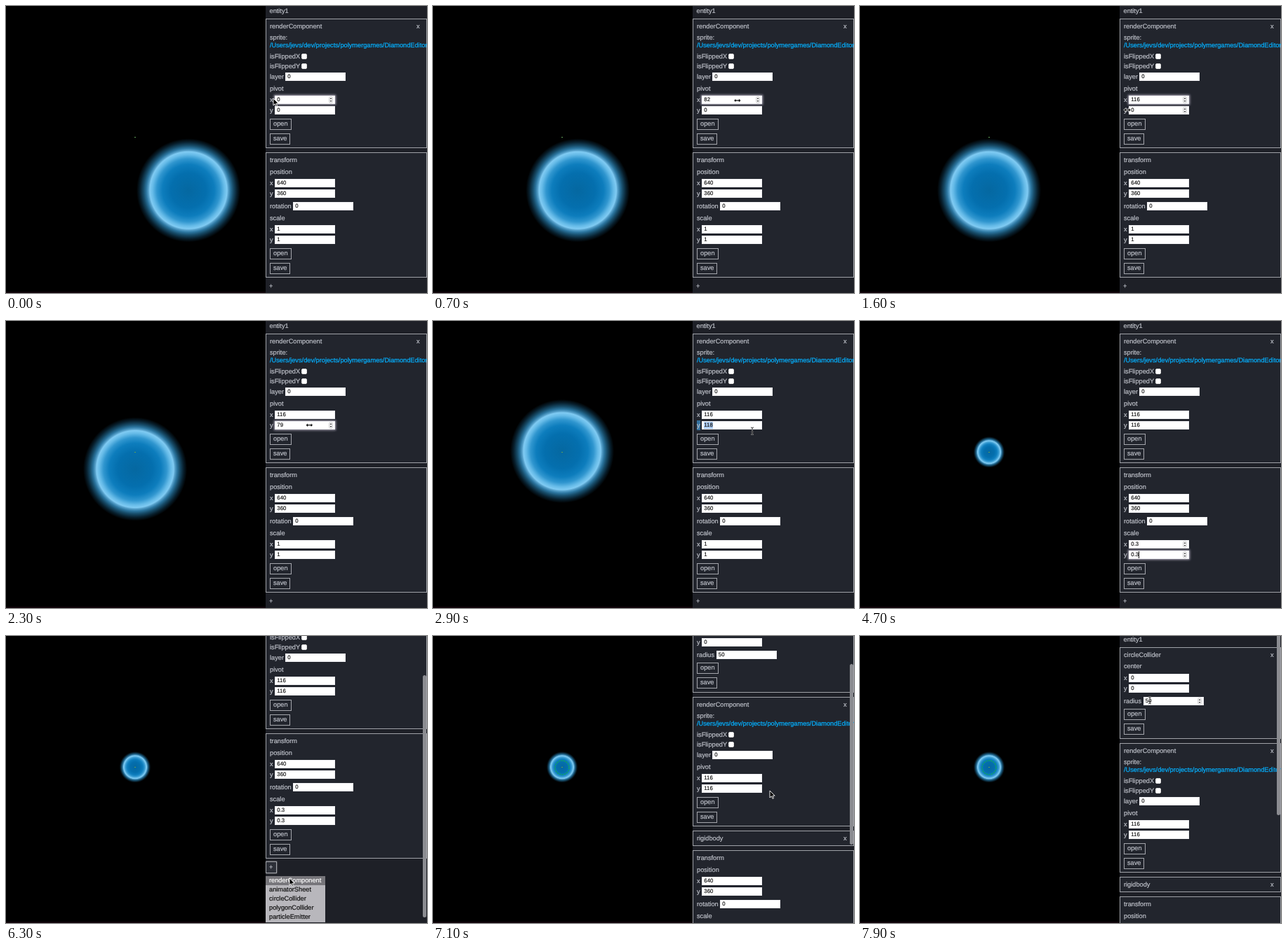
Write an HTML page that moves like this. It is 600 px wide and 410 px high and loops after 8 s.

```html
<!DOCTYPE html>
<html lang="en">
<head>
<meta charset="utf-8">
<title>Component editor</title>
<style>
html, body { margin: 0; width: 100%; height: 100%; overflow: hidden; background: #000; }
#stage { position: relative; width: 600px; height: 410px; overflow: hidden; background: #000;
  font: 9.22px/14px "Liberation Sans", Arial, sans-serif; color: #bfc2ca; text-rendering: geometricPrecision; }
#stage * { position: absolute; box-sizing: border-box; white-space: pre; }
#sprite { width: 152px; height: 152px; left: -76px; top: -76px;
  background: radial-gradient(circle 76px, #0568a1 0, #046fae 25px, #0d7dbd 37px, #3096cf 45px,
    #66bbe8 51px, #80cbf3 55px, #559fc9 57px, #2c76a0 60px, #174c69 64px, #08202e 69px, #000 74px); }
#pin { left: 183px; top: 187px; width: 2px; height: 1px; background: #5f9f58; }
#strip { left: 0; top: 408px; width: 600px; height: 2px; background: #10050a; }
#panel { left: 370px; top: 0; width: 230px; height: 410px; overflow: hidden; background: #1e2027; }
#list { left: 0; top: 0; width: 230px; }
.box { left: 0; width: 230px; border: 1px solid #a0a2a8; background: #22252d; }
.box > * { margin: -1px 0 0 -1px; }
.label, .button { -webkit-text-stroke: .2px currentColor; }
.link { color: #06a9f4; -webkit-text-stroke-width: .3px; }
.marked { background: #34719f; }
.field { width: 86px; height: 12px; background: #fff; border: 1px solid #f0f0f3; color: #111;
  font-size: 7.8px; line-height: 10px; }
.field.focus { box-shadow: 0 0 3px 1px #aaa6b6; }
.value { height: 10px; -webkit-text-stroke: .15px currentColor; }
.value.marked { background: #aecdf3; }
.value.caret { border-right: 1px solid #111; }
.spin { width: 6px; height: 10px; }
.check { width: 8px; height: 8px; border-radius: 2px; background: #fff; border: 1px solid #ddd; }
.button { height: 16px; border: 1px solid #a4a6ac; line-height: 13px; padding: 0 4px; }
#plus { left: 0; width: 16px; height: 17px; border: 1px solid transparent; line-height: 15px; padding-left: 4px; }
#plus.focus { border-color: #a4a6ac; background: #2d3038; box-shadow: 0 0 2px #888; }
#menu { left: 0; width: 85px; height: 66px; background: #b8b7bc; color: #111; }
.item { left: 0; width: 85px; height: 13px; line-height: 13px; padding-left: 5px; }
.item.hover { background: #77767b; color: #fff; }
#thumb { right: 1px; width: 5px; border-radius: 3px; background: #8b8c91; }
svg { overflow: visible; }
</style>
</head>
<body>
<div id="stage">
  <div id="holder" style="left:0;top:0"><div id="sprite"></div></div>
  <svg id="ring" width="1" height="1" style="left:184px;top:187.5px">
    <circle r="10" fill="none" stroke="#0fa85c" stroke-width="1.4" stroke-dasharray="2.2 1.3"/>
  </svg>
  <div id="pin"></div>
  <div id="strip"></div>
  <div id="panel"><div id="list"></div><div id="thumb"></div></div>
  <svg id="cursor" width="1" height="1" style="left:0;top:0">
    <path id="arrow" d="M0 0V10L2.4 7.8L4 11.4L5.6 10.7L4 7.2H7.2Z" fill="#000" stroke="#fff" stroke-width=".9"/>
    <path id="resize" d="M-5 0L-2 -3V-1H2V-3L5 0L2 3V1H-2V3Z" fill="#000" stroke="#fff" stroke-width=".8"/>
    <g id="beam" fill="none">
      <path d="M-2 -5Q0 -5 0 -3.5Q0 -5 2 -5M0 -3.5V3.5M-2 5Q0 5 0 3.5Q0 5 2 5M-1.3 1.5H1.3" stroke="#fff" stroke-opacity=".55" stroke-width="1.8"/>
      <path d="M-2 -5Q0 -5 0 -3.5Q0 -5 2 -5M0 -3.5V3.5M-2 5Q0 5 0 3.5Q0 5 2 5M-1.3 1.5H1.3" stroke="#222" stroke-width=".9"/>
    </g>
  </svg>
</div>
<script>
const LOOP = 8000, STEP = 100, VIEW = 410, ZOOM = 0.655, GAP = 6;
const $ = id => document.getElementById(id);
const list = $('list');
const fields = {};

function add(parent, cls, x, y, text = '') {
  const el = document.createElement('div');
  el.className = cls;
  el.style.left = x + 'px';
  el.style.top = y + 'px';
  el.textContent = text;
  parent.append(el);
  return el;
}

// Vertical positions are row centres, measured from the top of the box.
const label = (box, text, y, x = 6) => add(box, 'label', x, y - 7, text);

function field(box, name, text, y, x, value) {
  const tag = label(box, text, y);
  const el = add(box, 'field', x, y - 6);
  const val = add(el, 'value', 2.3, 0, value);
  const spin = add(el, 'spin', 76, 0);
  spin.innerHTML = '<svg width="6" height="10"><rect x=".5" y=".5" width="5" height="9" rx="2" fill="#f4f4f4" stroke="#c4c4c8" stroke-width=".7"/>' +
    '<path d="M1.5 4L3 2L4.5 4ZM1.5 6L3 8L4.5 6Z" fill="#444"/></svg>';
  fields[name] = { tag, el, val, spin };
}

function check(box, text, y) {
  label(box, text, y);
  add(box, 'check', 51, y - 4);
}

function makeBox(title, height, closable = true) {
  const el = add(list, 'box', 0, 0);
  el.style.height = height + 'px';
  label(el, title, 11);
  if (closable) label(el, 'x', 11, 215);
  return { el, height };
}

function buttons(box, y) {
  add(box, 'button', 6, y - 8, 'open');
  add(box, 'button', 6, y + 13, 'save');
}

label(list, 'entity1', 7, 5.5);

const collider = makeBox('circleCollider', 131);
label(collider.el, 'center', 27);
field(collider.el, 'cx', 'x', 44, 13, '0');
field(collider.el, 'cy', 'y', 59, 13, '0');
field(collider.el, 'radius', 'radius', 77, 33.5, '50');
buttons(collider.el, 96);

const render = makeBox('renderComponent', 185);
label(render.el, 'sprite:', 26.5);
label(render.el, '/Users/jevs/dev/projects/polymergames/DiamondEditor', 37.5).classList.add('link');
check(render.el, 'isFlippedX', 53.5);
check(render.el, 'isFlippedY', 68);
field(render.el, 'layer', 'layer', 83, 28, '0');
label(render.el, 'pivot', 100);
field(render.el, 'px', 'x', 116, 13, '0');
field(render.el, 'py', 'y', 131, 13, '0');
buttons(render.el, 151);

const rigid = makeBox('rigidbody', 22);

const transform = makeBox('transform', 179, false);
label(transform.el, 'position', 27.5);
field(transform.el, 'x', 'x', 44, 13, '640');
field(transform.el, 'y', 'y', 59, 13, '360');
field(transform.el, 'rotation', 'rotation', 76.5, 39, '0');
label(transform.el, 'scale', 93.5);
field(transform.el, 'sx', 'x', 110, 13, '1');
field(transform.el, 'sy', 'y', 125, 13, '1');
buttons(transform.el, 144.5);

const plus = add(list, 'label', 0, 0, '+');
plus.id = 'plus';
const menu = add(list, '', 0, 0);
menu.id = 'menu';
const items = ['renderComponent', 'animatorSheet', 'circleCollider', 'polygonCollider', 'particleEmitter']
  .map((name, i) => add(menu, 'item label', 0, i * 13, name));

// Linear value through [time, value] points.
function ramp(t, points) {
  let [t0, v0] = points[0];
  for (const [t1, v1] of points) {
    if (t < t1) return t1 === t0 ? v1 : v0 + (v1 - v0) * Math.max(0, t - t0) / (t1 - t0);
    t0 = t1; v0 = v1;
  }
  return v0;
}

// Latest value in a list of [time, value] steps.
const hold = (t, steps) => steps.reduce((v, s) => t >= s[0] ? s[1] : v, steps[0][1]);

const PIVOT_X = [[0, 0], [900, 106], [1100, 116]];
const PIVOT_Y = [[1700, 0], [2600, 118], [3100, 118], [3300, 116]];
const SCALE_X = [[0, '1'], [4200, '0'], [4300, '0.'], [4400, '0.3']];
const SCALE_Y = [[0, '1'], [4600, '0'], [4700, '0.3']];
const SCROLL = [[5600, 0], [5900, 70], [6600, 70], [6800, 206], [6900, 206], [7100, 68], [7200, 68], [7700, 2]];
const CURSOR_X = [[0, 381], [100, 382], [900, 451], [1100, 458], [1300, 458], [1600, 381], [1700, 381],
  [2600, 458], [2900, 455], [3100, 463], [3400, 463], [3800, 455], [5100, 455], [5500, 376],
  [5800, 376], [6100, 404], [6900, 404], [7100, 480], [7600, 480], [7800, 413]];
const CURSOR_Y = [[0, 132], [100, 135], [1300, 135], [1600, 148.5], [2600, 149], [2900, 157], [3100, 152],
  [3400, 152], [3800, 321], [5100, 321], [5500, 397], [5800, 397], [6100, 346], [6300, 346], [6500, 372],
  [6900, 372], [7100, 221], [7600, 221], [7800, 92]];
const CURSOR = [[0, 'arrow'], [100, 'resize'], [2700, 'beam'], [3100, 'arrow'], [3800, 'beam'], [4100, ''],
  [4900, 'beam'], [5200, 'arrow'], [7800, 'beam']];
const FOCUS = [[0, 'px'], [1700, 'py'], [2600, ''], [3100, 'py'], [3800, 'sx'], [4600, 'sy'], [5600, 'plus']];
const HOVER = [[0, ''], [1600, 'py'], [2600, ''], [3100, 'py'], [3600, ''], [3800, 'sx'], [5200, ''], [7800, 'radius']];
const MARKED = [[0, ''], [2700, 'py'], [3100, ''], [4000, 'sx'], [4200, '']];
const CARET = [[0, ''], [4200, 'sx'], [4600, 'sy'], [5600, '']];
const ITEM = [[0, -1], [6000, 0], [6400, 1], [6500, 2], [6600, -1]];

// Stacks the visible boxes and returns the height of the scrolled content.
function layout(t) {
  let y = 18;
  const shown = [[collider, t >= 6600], [render, true], [rigid, t >= 6900], [transform, true]];
  for (const [box, on] of shown) {
    box.el.style.display = on ? '' : 'none';
    if (!on) continue;
    box.el.style.top = y + 'px';
    y += box.height + GAP;
  }
  plus.style.top = y - 2 + 'px';
  menu.style.top = y + 19 + 'px';
  menu.style.display = t >= 5600 ? '' : 'none';
  return y + 92;
}

function draw(t) {
  const px = Math.round(ramp(t, PIVOT_X)), py = Math.round(ramp(t, PIVOT_Y));
  const sx = hold(t, SCALE_X), sy = hold(t, SCALE_Y);
  const kx = parseFloat(sx), ky = parseFloat(sy);
  const cx = 184 + (116 - px) * ZOOM * kx, cy = 187.3 + (116 - py) * ZOOM * ky;
  $('holder').style.transform = `translate(${cx}px, ${cy}px) scale(${kx}, ${ky})`;
  $('ring').style.display = t >= 6600 ? '' : 'none';

  Object.entries({ px, py, sx, sy }).forEach(([name, v]) => fields[name].val.textContent = v);
  const focus = hold(t, FOCUS), hover = hold(t, HOVER), marked = hold(t, MARKED), caret = hold(t, CARET);
  for (const [name, f] of Object.entries(fields)) {
    f.el.classList.toggle('focus', name === focus);
    f.spin.style.display = name === focus || name === hover ? '' : 'none';
    f.tag.classList.toggle('marked', name === marked);
    f.val.classList.toggle('marked', name === marked);
    f.val.classList.toggle('caret', name === caret);
  }
  // The hovered scale field keeps its arrows while the next one has focus.
  plus.classList.toggle('focus', focus === 'plus');
  const active = hold(t, ITEM);
  items.forEach((el, i) => el.classList.toggle('hover', i === active));

  const total = layout(t), scroll = Math.round(ramp(t, SCROLL)), thumb = $('thumb').style;
  list.style.top = -scroll + 'px';
  thumb.display = t >= 5700 ? '' : 'none';
  thumb.top = scroll * VIEW / total - 3 + 'px';
  thumb.height = VIEW * VIEW / total + 'px';

  const shape = hold(t, CURSOR);
  $('cursor').style.transform = `translate(${ramp(t, CURSOR_X)}px, ${ramp(t, CURSOR_Y)}px)`;
  for (const id of ['arrow', 'resize', 'beam']) $(id).style.display = id === shape ? '' : 'none';
}

const start = performance.now();
function tick() {
  const t = (performance.now() - start) % LOOP;
  draw(Math.floor(t / STEP) * STEP);
  requestAnimationFrame(tick);
}
tick();
</script>
</body>
</html>
```
